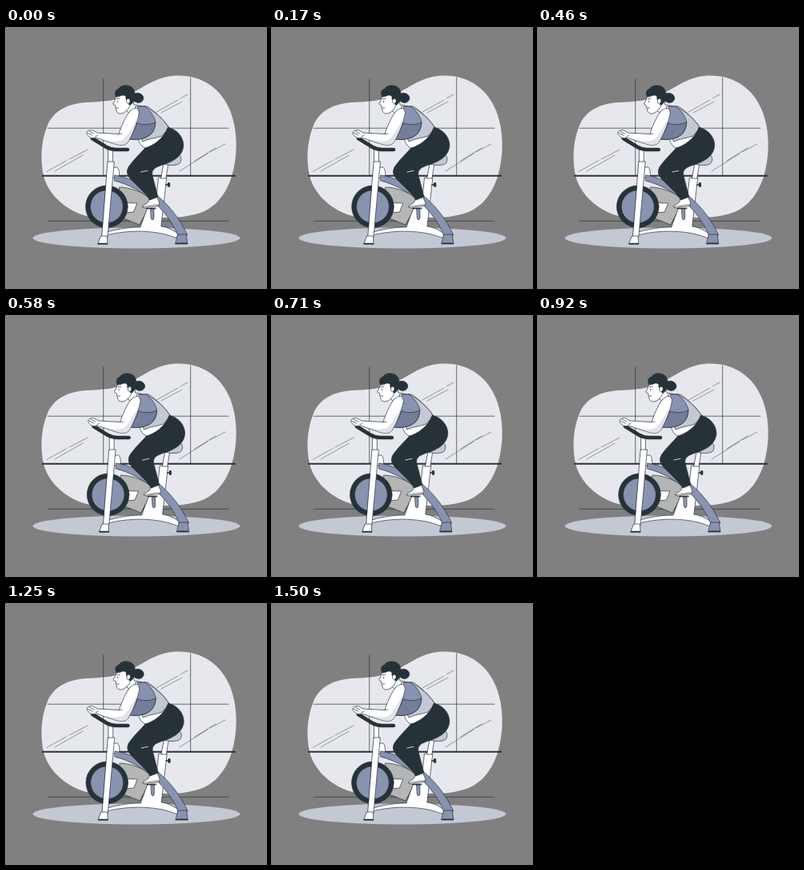
These frames come from a looping animation (325 px wide and 325 px high, 1540 ms). An HTML page:

```html
<!DOCTYPE html>
<html lang="en">
<head>
<meta charset="utf-8">
<title>Exercise bike</title>
<style>
  html, body { margin: 0; width: 100%; height: 100%; overflow: hidden; background: #808080; }
  svg { display: block; width: 100%; height: 100%; }
  .ink { fill: none; stroke: #263238; stroke-width: .7; stroke-linecap: round; stroke-linejoin: round; }
  .white { fill: #fff; }
  .blue { fill: #8993b0; }
  .deep { fill: #747d9a; }
  .pale { fill: #c4c8d5; }
  .grey { fill: #b5b5b5; }
  .dark { fill: #263238; }
  .shade { fill: #e1e3eb; stroke: none; }
  .fine { stroke-width: .45; }
  .bold { stroke-width: 1.6; }
  .sill { stroke-width: 2; stroke-linecap: butt; }
  .bar { stroke-width: 4.7; }
  .crease { stroke: #fff; stroke-width: .8; }
</style>
</head>
<body>
<svg viewBox="0 0 325 325">
  <!-- Room -->
  <path fill="#e7e8ee" d="M99 93C120 92 140 92 160 80C178 70 193 59.500 215 59.500C248 59.500 270 78 280 103C290 128 290 160 282 186C273 213 257 229 234 233.500Q222 236.500 209 237L110 236.500Q104 236 99 234.500C72 227 50 205 46 180C42 155 46 135 53 119C62 102 78 95 99 93Z"/>
  <ellipse class="pale" cx="163" cy="262.500" rx="129.500" ry="13"/>
  <g class="ink">
    <path d="M121.700 64V184M230.700 62V184M52 125.200H278M52 241.300H278"/>
    <path class="sill" d="M45 184.700H287"/>
    <path class="fine" d="M51 179.500L76 165.500M79 164L102 152M61 179L96 159M188 105L215 90M218 88L227 83M194 106L220 92M217 179L252 157M255 155L274 145M236 166L262 150"/>
  </g>

  <g id="rider">
    <!-- Bike -->
    <g class="ink">
      <path class="grey" d="M142 199C156 199 172 206 184 214L167 246L142 236Z"/>
      <path class="white" d="M150 218.500L164 219L159.500 230L148 231Z"/>
      <circle class="dark" cx="126" cy="223.300" r="26.300"/>
      <circle class="blue" cx="126" cy="223.300" r="20.500"/>
      <path class="white" d="M133 174H139C142 177 142 182 141 187H133Z"/>
      <path class="white" d="M191 187H201L194 248C202 249 208 252 215 257L214 263C190 252 152 252 126 259L127 255C143 250 158 249 168 249L178 222L188 210Z"/>
      <path class="blue" d="M136 184C167 188 207 215 227 259H215C202 228 172 200 136 191Z"/>
      <path class="blue" d="M215 258H225.500L227 270H212Z"/>
      <path class="bold" d="M213 269.300H226.500"/>
      <path class="white" d="M197.500 170H203L200 188H194Z"/>
      <path class="bold" d="M200 196H204"/>
      <rect class="dark" x="202.500" y="193.500" width="2.500" height="5" rx=".7"/>
      <path class="pale" d="M195 166C203 164 210 157 216 158.500C220 160 220 168 216 170C209 173 200 171 195 169Z"/>
      <path class="white" d="M128 151H133.500V168H128Z"/>
      <path class="white" d="M127.500 167H135.500L127 262H120Z"/>
      <path class="white" d="M119 260H126.500L127 270H115Z"/>
      <path class="bold" d="M115.500 269.600H126.700"/>
      <path class="blue" d="M181 226H185L185 238Q183 242 181.500 238Z"/>
      <path class="bold" d="M176 225.500H187"/>
    </g>

    <!-- Torso -->
    <g class="ink">
      <path class="white" d="M150 92L151 104L158 109L178 104C174 98 167 97 160 96L159 88Z"/>
      <path class="white" d="M162 98H177C187 105 197 114 204 125L196 146L178 151C170 150 167 145 165 138Z"/>
      <path class="pale" d="M173 97.500C186 104 197 114 204 125L195 135C187 138 179 138 171 142L164 125Z"/>
      <path class="blue" d="M165 98L174 98C181 104 185 110 187 117Q187 127 181 133Q172 141 154 139C151 129 157 121 163 113Z"/>
      <path class="deep" d="M164 119Q176 123 187 118Q186 128 181 133Q172 141 154 139Q160 130 164 119Z"/>
    </g>

    <!-- Legs -->
    <g class="ink">
      <path class="white" d="M179 214L189 211C189 214 193 217 191.500 222C187 224 181 223 175 225C171 225 170 223.500 171 222C175 220 179 219 179 214Z"/>
      <path d="M171 223.500C179 223 184 221 191 221"/>
      <path class="dark" d="M174 150C184 147 197 139 202.500 124C214 127 222 136 222 147C221 160 210 167 193 172C185 175 182 178 183 184L190 211L180 215C175 207 168 201 157 190C150 183 150 177 156 170C161 163 168 157 174 150Z"/>
      <path class="crease" d="M169 180Q173 179 177 178.500"/>
    </g>

    <!-- Arm and handlebar -->
    <g class="ink">
      <path class="bar" d="M108 138L125 148.500Q131 152 138 152H152"/>
      <path class="white" d="M155 104C162 97 168 101 166 109C163 121 158 133 153 142C150 147 144 147 138 145.500L112 137C107 139 103 136 101 132C101 128 105 127 109 128L114 131L141 132.500C144 124 149 111 155 104Z"/>
      <path class="shade" d="M165.500 110C162 123 157 134 152.500 141.500C150 146 144 146 138 145L122 139.500C134 142 143 143 148 138C154 131 160 121 165.500 110Z"/>
      <path d="M102 131L108 134M104 129L110 132M112 136L115 134M141 132.500L145 132"/>
    </g>

    <!-- Head -->
    <g class="ink">
      <path class="white" d="M139 81C137 87 137 90 133.700 95L137 97L137 100L138 101.500C137.500 106 142 108.500 147 106C151 104 154 100 156 95L157 82L148 78Z"/>
      <path class="dark" d="M138 86C135 81 137 77 141 76C143 72 149 71 154 72.500C159 74 161 78 161 82C166 80 172 83 172 88C171 94 164 95 160 91C158 94 157 96 154 96C153 91 151 92 150 88C151 84 146 83 143 85Z"/>
      <path class="white" d="M151 89C154 87 157 90 154 94C152 96 150 93 151 89Z"/>
      <path d="M138.500 88.700L142 88.200M139.500 91V93M138 100H141"/>
    </g>
  </g>
</svg>
<script>
  const LOOP = 1540, STEPS = 37, SHAKE = 1500, LEAD = 30, SCALE = 0.65;
  const sway = [0, -1, 2, -4, 4, -4, 4, -4, 2, -1, 0];
  const rider = document.getElementById('rider');

  function offsetAt(ms) {
    const step = Math.floor(ms % LOOP / LOOP * STEPS);
    const pos = (step * 1000 / 24 + LEAD) % SHAKE / SHAKE * 10;
    const i = Math.floor(pos);
    return SCALE * (sway[i] + (sway[i + 1] - sway[i]) * (pos - i));
  }

  const start = performance.now();
  function draw() {
    const x = offsetAt(performance.now() - start);
    rider.setAttribute('transform', `translate(${x.toFixed(3)} 0)`);
    requestAnimationFrame(draw);
  }
  draw();
</script>
</body>
</html>
```
